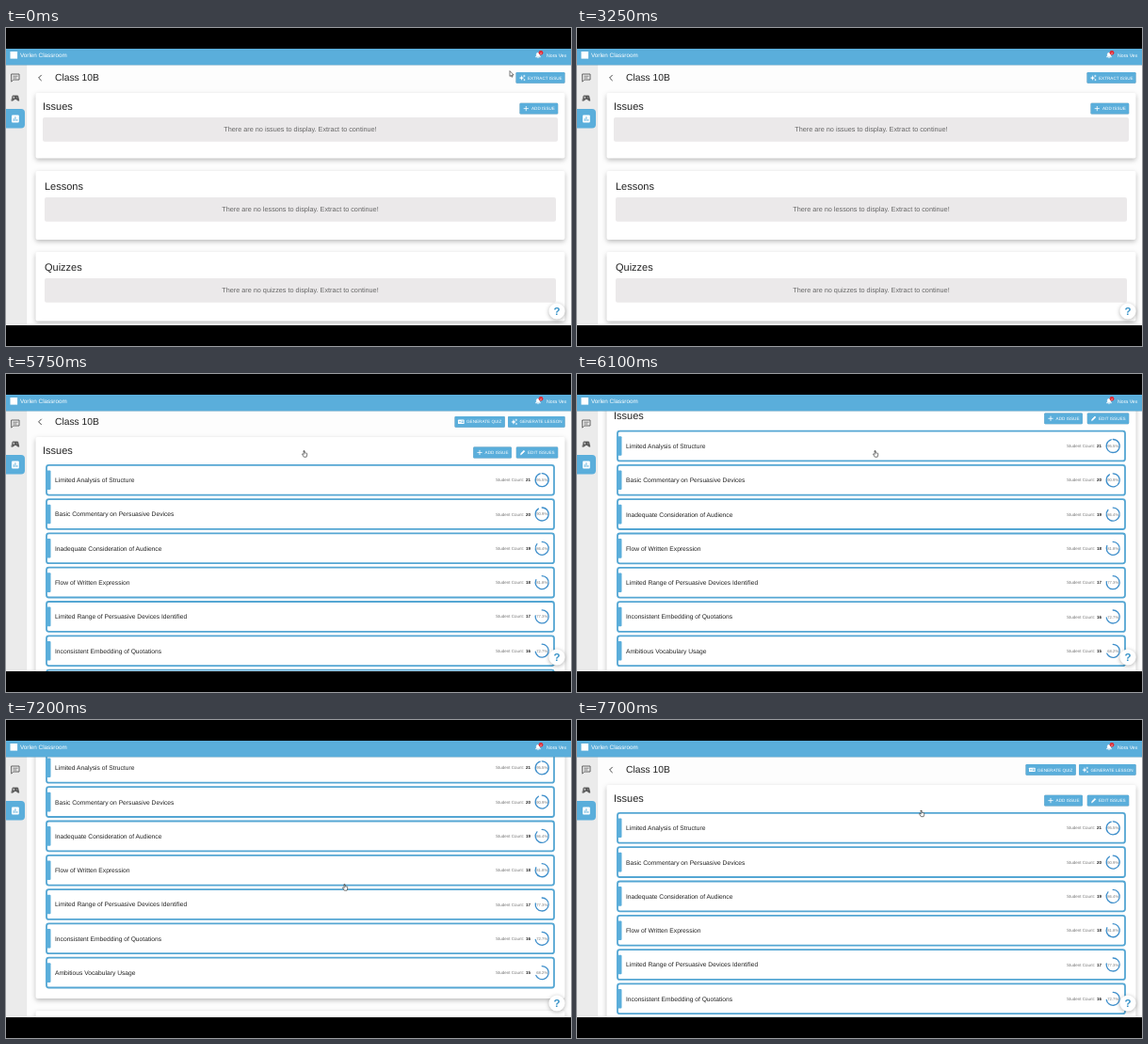
Animation, 600 px wide and 338 px high, one loop 7.75 s. Source, as an HTML page:

```html
<!DOCTYPE html>
<html lang="en">
<head>
<meta charset="utf-8">
<title>Class issues</title>
<style>
  html, body { margin: 0; width: 100%; height: 100%; overflow: hidden; background: #000; }
  svg { display: block; width: 600px; height: 338px; }
  text { font-family: "Liberation Sans", Arial, sans-serif; text-rendering: geometricPrecision; white-space: pre; }
  .card { fill: #fff; filter: drop-shadow(0 2px 2.5px rgba(0, 0, 0, .26)); }
  .btn { filter: drop-shadow(0 .6px .7px rgba(0, 0, 0, .3)); }
  .float { filter: drop-shadow(0 1px 2px rgba(0, 0, 0, .3)); }
</style>
</head>
<body>
<svg id="stage" viewBox="0 0 600 338"></svg>
<script>
const LOOP = 7750, STEP = 50;
const BLUE = '#5aaedb', EDGE = '#54a6d3', INK = '#222', GREEN = '#4caf50';

const rect = (x, y, w, h, fill, more = '') =>
  `<rect x="${x}" y="${y}" width="${w}" height="${h}" fill="${fill}" ${more}/>`;
const text = (x, y, size, str, fill = INK, more = '') =>
  `<text x="${x}" y="${y}" font-size="${size}" fill="${fill}" ${more}>${str}</text>`;
const path = (d, stroke, width = 1, fill = 'none') =>
  `<path d="${d}" stroke="${stroke}" stroke-width="${width}" fill="${fill}" stroke-linecap="round" stroke-linejoin="round"/>`;
const group = (id, inner, more = '') => `<g id="${id}" ${more}>${inner}</g>`;
const at = (x, y, inner) => `<g transform="translate(${x} ${y})">${inner}</g>`;

const icons = {
  plus: path('M-2.2 0H2.2M0 -2.2V2.2', '#fff', .8),
  pen: path('M-2 2L-1.7 .8L1.4 -2.2L2.3 -1.3L-.8 1.7Z', '#fff', .6, '#fff'),
  spark: path('M-.8 -2.2L-.1 -.5L1.6 .2L-.1 .9L-.8 2.6L-1.5 .9L-3.2 .2L-1.5 -.5Z', '#fff', .2, '#fff') +
    path('M2 -2.7V-1.1M1.2 -1.9H2.8M2.2 1.6V2.8M1.6 2.2H2.8', '#fff', .6),
  quiz: rect(-3.3, -2.2, 6.6, 4.4, '#fff', 'rx=".6"') +
    path('M-2 0H-.6M.8 -.7H2M.8 .7H2', BLUE, .8)
};

function button(x, y, w, label, icon, textX) {
  return rect(x, y, w, 11.8, BLUE, 'rx="1.2" class="btn"') +
    at(x + 6.8, y + 5.9, icons[icon]) +
    text(textX, y + 7.6, 4.64, label, '#fff');
}

function emptyCard(y, h, x, title, name) {
  const inset = x === 39 ? 547 : 543, top = y + (x === 39 ? 26 : 28);
  return rect(31.5, y, 562, h, '#fff', 'class="card" rx="2"') +
    text(x, top - 8.3, 11, title) +
    rect(x, top, inset, 25.8, '#ebe9ea', 'rx="2"') +
    text(312.5, top + 15, 7.26, `There are no ${name} to display. Extract to continue!`, '#666', 'text-anchor="middle"');
}

function ring(share) {
  const a = share * Math.PI * 2, r = 7;
  return path(`M0 ${-r}A${r} ${r} 0 1 1 ${r * Math.sin(a)} ${-r * Math.cos(a)}`, '#3f8fcb', 1.3) +
    text(0, 1.5, 4.2, (share * 100).toFixed(1) + '%', '#777', 'text-anchor="middle"');
}

function issueRow(label, i) {
  const y = 114.8 + i * 36.3, count = 21 - i;
  return at(0, y,
    rect(43, -15.9, 539, 31.8, '#fff', `rx="2.5" stroke="${EDGE}" stroke-width="1.8"`) +
    rect(42.5, -10.3, 5, 20.6, BLUE, 'rx="1"') +
    text(52, 2.4, 6.7, label) +
    text(520, 1.6, 4.5, 'Student Count:', '#777') +
    text(552, 1.6, 4.5, count, INK, 'font-weight="bold"') +
    at(569.2, 0, ring(count / 22)));
}

function toast(id, color, mark, lines, stamp) {
  return group(id,
    rect(405.8, 42.6, 189.6, 38, '#fff', `rx="2" stroke="${color}" stroke-width="1.6" class="float"`) +
    `<circle cx="417.8" cy="61.8" r="5.4" fill="${color}"/>` + at(417.8, 61.8, mark) +
    lines.map((s, i) => text(429, 55.9 + i * 9.7, 6.48, s, '#111', 'font-weight="bold"')).join('') +
    text(429, 73.2, 4.55, stamp, '#777'));
}

const heading = path('M37.4 50.2L34.6 53L37.4 55.8', '#333', .9) + text(52, 56.4, 10.3, 'Class 10B');

const emptyPage = heading +
  button(541.5, 47, 52, 'EXTRACT ISSUE', 'spark', 554) +
  emptyCard(69, 69.5, 39, 'Issues', 'issues') +
  button(545.5, 79.7, 40.7, 'ADD ISSUE', 'plus', 558) +
  emptyCard(152, 73, 41, 'Lessons', 'lessons') +
  emptyCard(238, 73.5, 41, 'Quizzes', 'quizzes');

const issues = [
  'Limited Analysis of Structure', 'Basic Commentary on Persuasive Devices',
  'Inadequate Consideration of Audience', 'Flow of Written Expression',
  'Limited Range of Persuasive Devices Identified',
  'Inconsistent Embedding of Quotations', 'Ambitious Vocabulary Usage'
];
const listPage = heading +
  button(476.5, 47, 53.3, 'GENERATE QUIZ', 'quiz', 489) +
  button(533, 47, 60.6, 'GENERATE LESSON', 'spark', 545.5) +
  rect(31.5, 69, 562, 291, '#fff', 'class="card" rx="2"') +
  text(39, 86.7, 11, 'Issues') +
  button(496.2, 79.7, 40.7, 'ADD ISSUE', 'plus', 508.6) +
  button(541.8, 79.7, 44.4, 'EDIT ISSUES', 'pen', 554) +
  issues.map(issueRow).join('') +
  emptyCard(373, 73, 41, 'Lessons', 'lessons') +
  emptyCard(459, 73.5, 41, 'Quizzes', 'quizzes');

const sidebar = rect(0, 39, 21.5, 277, '#ebebeb') + rect(21.5, 39, .6, 277, '#dedede') +
  path('M6 49H14V55H7.8L6 56.8Z', '#555', .9) + path('M7.8 51.2H12.2M7.8 53H11', '#555', .7) +
  path('M7.4 72H12.6L13.8 77.2L12 76.8L11 75.6H9L8 76.8L6.2 77.2Z', '#555', .8, '#555') +
  path('M8.3 73.1V74.5M7.6 73.8H9M11.6 73.8H11.7', '#ebebeb', .6) +
  rect(-4, 86, 24, 20.4, BLUE, 'rx="4"') +
  rect(6, 92.6, 7.8, 7.8, '#fff', 'rx="1"') +
  path('M8 96.6V98.5M9.9 94.6V98.5M11.8 97.3V98.5', BLUE, .9);

const header = rect(0, 22, 600, 17.4, BLUE, 'class="btn"') +
  rect(4.5, 25, 7.6, 7.6, '#fff') +
  text(15, 31.2, 6.3, 'Vorlen Classroom', '#fff') +
  path('M562.6 30.5L563.3 29.6V28A1.7 1.7 0 0 1 566.7 28V29.6L567.4 30.5ZM564.6 31.6H565.4', '#fff', .6, '#fff') +
  '<circle cx="568" cy="26.3" r="2.4" fill="#e02b35"/>' + text(567.2, 27.5, 3, '2', '#fff') +
  text(574, 30.6, 5.2, 'Nora Vex', '#fff');

const help = '<circle class="float" cx="585" cy="301" r="8.6" fill="#fff"/>' +
  text(585, 305, 11.5, '?', '#3a94c8', 'font-weight="bold" text-anchor="middle"');

const infoMark = path('M0 -.3V2.5M0 -2.4V-2.3', '#fff', 1.1);
const tickMark = path('M-2.5 .1L-.8 1.9L2.6 -1.7', '#fff', 1.1);

const cursor = group('arrow', path('M0 0V5.4L1.3 4.3L2.1 6.2L3 5.8L2.2 4H3.8Z', '#222', .6, '#fff')) +
  group('hand', path('M-.8 -3V.6L-1.8 -.2C-2.5 -.4 -2.7 .2 -2.3 .7L-.7 3.2H2.1L2.7 1V-.4C2.6 -1 2 -1 1.8 -.7C1.5 -1.2 .9 -1.1 .8 -.8L.3 -1V-3C.2 -3.6 -.7 -3.6 -.8 -3Z', '#222', .6, '#fff'));

const stage = document.getElementById('stage');
stage.innerHTML =
  '<clipPath id="screen"><rect y="22" width="600" height="294"/></clipPath>' +
  rect(0, 0, 600, 338, '#000') +
  group('view',
    rect(0, 22, 600, 294, '#fdfdfd') +
    group('empty', emptyPage) + group('list', listPage) +
    sidebar + header + help +
    toast('sent', EDGE, infoMark, ['Request successfully sent. Please wait for the', 'result.'], '9/12/2024, 2:55:56 AM') +
    toast('done', GREEN, tickMark, ['Issues extracted successfully for class assignment', '10'], '9/12/2024, 2:56:42 AM') +
    group('cursor', cursor),
    'clip-path="url(#screen)"');

// Rows: time, then values
const pointer = [[0, 535, 46], [50, 535, 46], [350, 562, 53], [550, 562, 53], [1300, 288, 187],
  [1350, 288, 187], [1700, 449, 17.5], [1950, 449, 17.5], [2100, 449, 10], [4900, 449, 10],
  [5550, 317, 85], [6550, 317, 85], [7150, 360, 178], [7250, 360, 178], [7700, 366, 99.5]];
const scroll = [[5700, 0], [6050, 38.3], [6100, 38.3], [6450, 78], [7100, 78], [7200, 64], [7650, 0]];
const sentX = [[550, 200], [800, 0], [1950, 0], [2250, 200]];
const doneX = [[3350, 200], [3600, 0], [4950, 0], [5250, 200]];

function sample(track, t) {
  const next = track.findIndex(k => k[0] > t);
  if (next === 0) return track[0].slice(1);
  if (next < 0) return track[track.length - 1].slice(1);
  const a = track[next - 1], b = track[next];
  const p = (t - a[0]) / (b[0] - a[0]), e = p * p * (3 - 2 * p);
  return a.slice(1).map((v, i) => v + (b[i + 1] - v) * e);
}

const el = id => document.getElementById(id);
const move = (id, x, y) => el(id).setAttribute('transform', `translate(${x} ${y})`);
const show = (id, on) => el(id).setAttribute('display', on ? 'inline' : 'none');

function draw(t) {
  const listed = t >= 3350;
  show('empty', !listed);
  show('list', listed);
  move('list', 0, -sample(scroll, t)[0]);
  for (const [id, track] of [['sent', sentX], ['done', doneX]]) {
    const x = sample(track, t)[0];
    show(id, x < 200);
    move(id, x, 0);
  }
  const hand = (t >= 200 && t < 700) || t >= 5350;
  show('hand', hand);
  show('arrow', !hand);
  show('cursor', t < 2100 || t >= 4900);
  move('cursor', ...sample(pointer, t));
}

const start = performance.now();
function tick() {
  const t = (performance.now() - start) % LOOP;
  draw(Math.floor(t / STEP) * STEP);
  requestAnimationFrame(tick);
}
draw(0);
requestAnimationFrame(tick);
</script>
</body>
</html>
```
